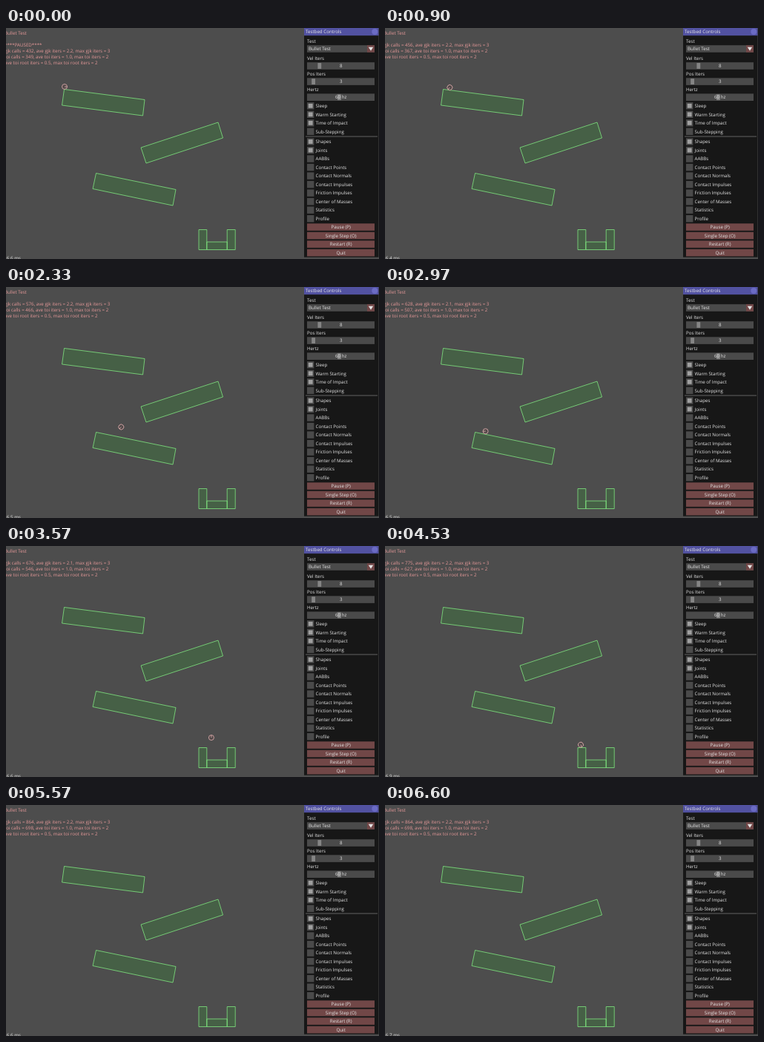
An HTML page that plays this animation: 503x311 px, repeating every 6660 ms.

```html
<!DOCTYPE html>
<html lang="en">
<head>
<meta charset="utf-8">
<title>Testbed</title>
<style>
  html, body { margin: 0; width: 100%; height: 100%; overflow: hidden; background: #4d4d4d; }
  svg { display: block; width: 503px; height: 311px; }
  text { font: 6.2px "Open Sans", "Noto Sans", sans-serif; fill: #e6e6e6; text-rendering: geometricPrecision; white-space: pre; }
  .mid { text-anchor: middle; }
  #log text { fill: #e69999; }
  #bodies { fill: #466046; stroke: #80e680; stroke-width: .8; }
  #ball { fill: #534a4a; stroke: #e6b3b3; stroke-width: .8; }
  .frame { fill: #4a4a4a; }
  .grab { fill: #858585; }
  .check { fill: #a0a0a0; }
  .button { fill: #714747; }
</style>
</head>
<body>
<svg viewBox="0 0 503 311">
  <g id="bodies">
    <path d="M78.5 82.5L187 96.5 184.5 118 75.5 104Z"/>
    <path d="M182 161L286 127 292.5 148 189 182Z"/>
    <path d="M121.5 195.5L229 217.5 225 239 117 216.5Z"/>
    <path d="M260 271.5h10.8v27H260zM270.8 288h27.4v10.5h-27.4zM298.2 271.5h11v27h-11z"/>
  </g>
  <g id="ball"><circle r="3.5"/><path d="M0 0H3.5"/></g>
  <g id="log"></g>
  <g id="panel"></g>
</svg>
<script>
const LOOP = 6660, GRAVITY = 3350, RADIUS = 3.6;
const $ = id => document.getElementById(id);

function add(parent, tag, attrs, content = "") {
  const el = document.createElementNS("http://www.w3.org/2000/svg", tag);
  for (const key in attrs) el.setAttribute(key, attrs[key]);
  el.textContent = content;
  return parent.appendChild(el);
}

// Controls panel
const panel = $("panel");
const box = (x, y, width, height, cls) => add(panel, "rect", { x, y, width, height, class: cls });
const label = (x, middle, str, cls = "") => add(panel, "text", { x, y: middle + 2.2, class: cls }, str);

add(panel, "rect", { x: 402, y: 0, width: 100.5, height: 308.6, fill: "#171717" });
add(panel, "rect", { x: 402, y: 0, width: 100.5, height: 10.2, fill: "#5252a1" });
add(panel, "circle", { cx: 497.3, cy: 5, r: 4, fill: "#6b6bc4" });
label(404, 5, "Testbed Controls");

label(406, 17.5, "Test");
box(406, 23.2, 91, 9.6, "frame");
box(487, 23.2, 10, 9.6, "button");
add(panel, "path", { d: "M488.8 25.8h6.4l-3.2 5z", fill: "#e6e6e6" });
label(408, 28.2, "Bullet Test");

function slider(name, y, grabX, value) {
  label(406, y - 10.2, name);
  box(406, y - 4.8, 91, 9.6, "frame");
  box(grabX, y - 3.9, 4.8, 7.8, "grab");
  label(451.7, y, value, "mid");
}
slider("Vel Iters", 51, 420.4, "8");
slider("Pos Iters", 72.1, 412.2, "3");
slider("Hertz", 93.2, 447, "60 hz");

function checks(y, names, ticked) {
  names.forEach((name, i) => {
    const middle = y + i * 11.52;
    box(406, middle - 4.7, 9.4, 9.4, "frame");
    if (i < ticked) box(407.8, middle - 2.9, 5.8, 5.8, "check");
    label(417.5, middle, name);
  });
}
checks(104.8, ["Sleep", "Warm Starting", "Time of Impact", "Sub-Stepping"], 3);
add(panel, "rect", { x: 404, y: 145.7, width: 97, height: .7, fill: "#808080" });
checks(153, ["Shapes", "Joints", "AABBs", "Contact Points", "Contact Normals", "Contact Impulses",
  "Friction Impulses", "Center of Masses", "Statistics", "Profile"], 2);

["Pause (P)", "Single Step (O)", "Restart (R)", "Quit"].forEach((name, i) => {
  const middle = 268 + i * 11.52;
  box(406, middle - 4.8, 91, 9.6, "button");
  label(451.7, middle, name, "mid");
});

// Log text
const line = y => add($("log"), "text", { x: -2, y });
line(9.2).textContent = "Bullet Test";
const lines = [25.2, 33.2, 41.2, 49.2].map(line);
const timer = add(document.querySelector("svg"), "text", { x: .8, y: 311.7 });

// time, gjk calls, toi calls, average gjk iters, step ms
const marks = [
  [0, 432, 349, 2.2, 6.6], [680, 432, 349, 2.2, 6.6], [1530, 526, 420, 2.1, 6.7],
  [2330, 576, 466, 2.2, 6.5], [3570, 676, 546, 2.1, 6.6], [4530, 775, 627, 2.2, 6.9],
  [5400, 864, 698, 2.2, 6.6], [5570, 864, 698, 2.2, 6.6], [6600, 864, 698, 2.2, 6.7]
];

function jitter(n) {
  const r = Math.sin(n * 12.9898 + 4) * 43758.5453;
  return 6.4 + (r - Math.floor(r)) * .65;
}

function showLog(t, step) {
  const i = Math.max(0, marks.findLastIndex(m => m[0] <= t));
  const a = marks[i], b = marks[i + 1] || a;
  const k = b === a ? 0 : (t - a[0]) / (b[0] - a[0]);
  const count = col => Math.round(a[col] + (b[col] - a[col]) * k);
  const average = (k < .5 ? a : b)[3].toFixed(1);
  const rows = [
    `gjk calls = ${count(1)}, ave gjk iters = ${average}, max gjk iters = 3`,
    `toi calls = ${count(2)}, ave toi iters = 1.0, max toi iters = 2`,
    "ave toi root iters = 0.5, max toi root iters = 2"
  ];
  if (t < 700) rows.unshift("****PAUSED****");
  lines.forEach((el, j) => el.textContent = rows[j] || "");
  timer.textContent = (t === a[0] ? a[4] : jitter(step)).toFixed(1) + " ms";
}

// Ball path: each leg ends at a time in seconds
const fall = (t0, x, y, vx, vy) => t => {
  const d = t - t0;
  return [x + vx * d, y + vy * d + GRAVITY / 2 * d * d];
};
// Rolling on a slope through (px, py), turning point at (t0, x0)
const roll = (t0, x0, half, px, py, slope) => t => {
  const x = x0 + half * (t - t0) ** 2;
  return [x, py + slope * (x - px)];
};
function tip(t) {
  const angle = .072 * Math.sinh(23.6 * (t - 5.12));
  return [260 - 4 * Math.sin(angle), 271.5 - 4 * Math.cos(angle)];
}
const legs = [
  [.69, () => [79, 79]],
  [1.53, t => {
    const d = t - .69, run = 10 * d + 142 * d * d;
    return [79 + run, 79 + .1244 * run];
  }],
  [1.6926, fall(1.53, 187.5, 92.5, 240, 31)],
  [2.213, roll(1.79, 229, -265, 181.5, 157, -.327)],
  [2.348, fall(2.213, 181.5, 157, -224, 73)],
  [3.425, roll(2.7177, 121.9, 215, 122, 191.4, .2056)],
  [3.612, fall(3.425, 229.5, 213.5, 327, 64)],
  [3.622, t => [290.7 + 330 * (t - 3.612), 284 - 300 * (t - 3.612)]],
  [3.822, fall(3.622, 294, 281, -126, -402)],
  [5.12, t => [268.8 - 6.8 * (t - 3.822), 267.6]],
  [5.254, tip],
  [LOOP, fall(5.254, 257, 268.9, -53, 60)]
];

function showBall(t) {
  const [x, y] = legs.find(leg => t <= leg[0])[1](t);
  const turn = (x - 79) / RADIUS * 180 / Math.PI;
  $("ball").setAttribute("transform", `translate(${x} ${Math.min(y, 330)}) rotate(${turn})`);
}

// The picture advances in steps of a thirtieth of a second
function draw() {
  const now = performance.now() % LOOP;
  const step = Math.min(198, Math.floor((Math.floor(now / 10) + .4) * .3));
  const t = Math.round(step / .3) * 10;
  showLog(t, step);
  showBall(t / 1000);
  requestAnimationFrame(draw);
}
draw();
</script>
</body>
</html>
```
